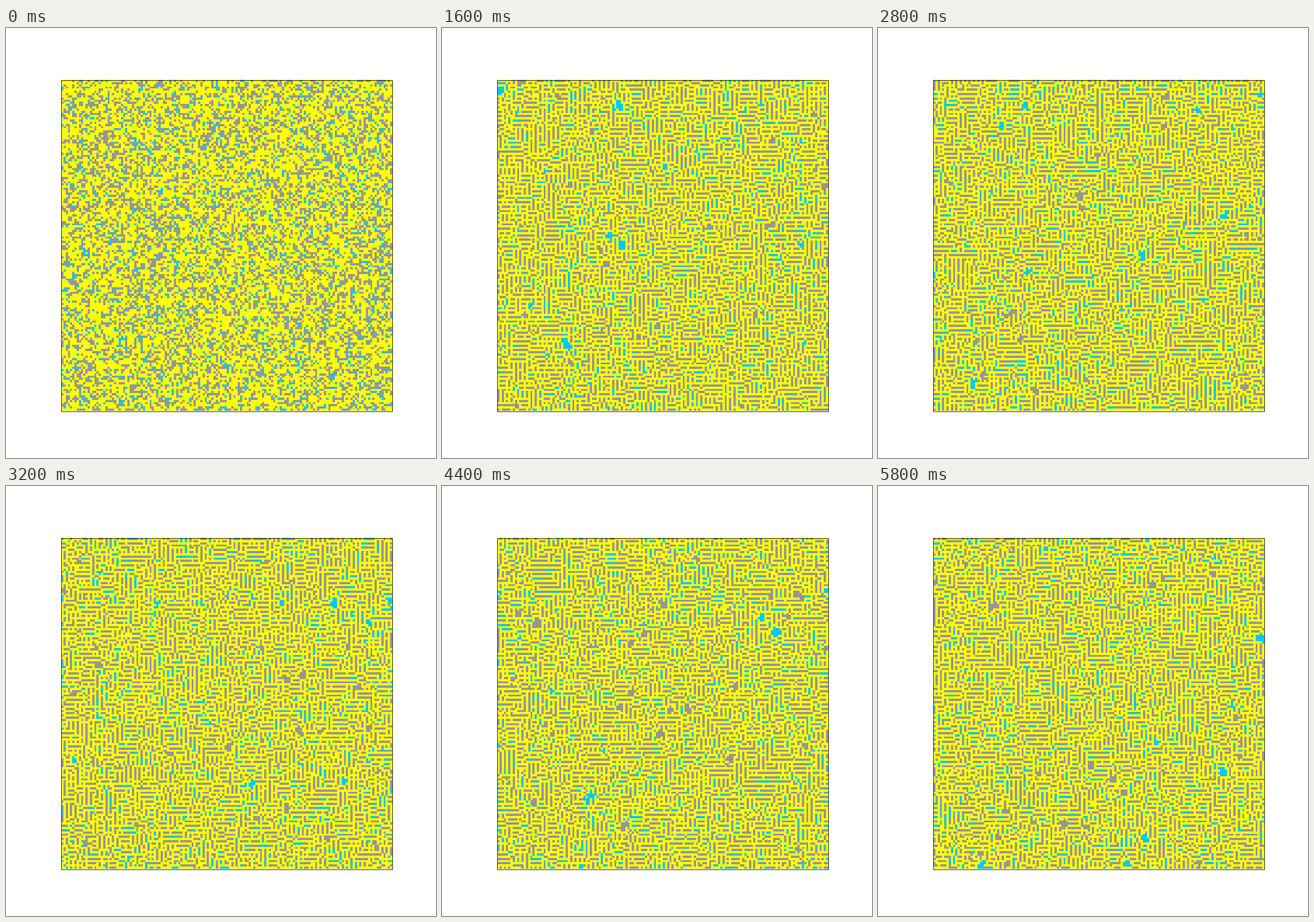
Animation of 748x748 px, one loop 6 s. Source, as a matplotlib script:

```python
import numpy as np
import matplotlib.pyplot as plt
from matplotlib.animation import FuncAnimation
from matplotlib.colors import ListedColormap
from matplotlib.patches import Rectangle

SIZE, DPI = 748, 100
LEFT, TOP, SIDE = 96, 90, 576
N = 150
FRAMES, INTERVAL = 30, 200
YELLOW, GRAY, CYAN = 0, 1, 2
ORTHO = [(0, 1), (1, 0), (0, -1), (-1, 0)]
DIAG = [(1, 1), (1, -1), (-1, 1), (-1, -1)]

rng = np.random.default_rng(11)


def chance(p):
    return rng.random((N, N)) < p


def shift(a, step):
    return np.roll(a, step, axis=(0, 1))


def count(a, steps):
    return sum(shift(a, s) for s in steps)


def relax(on, fixed, passes):
    """Cells avoid crowded sites, which sorts them into thin lines and dots."""
    for _ in range(passes):
        cost = count(on, ORTHO) + 0.8 * count(on, DIAG)
        p = 1 / (1 + np.exp((cost - 2.35) / 0.18))
        on = np.where(chance(0.2), chance(p), on).astype(int)
        on[fixed] = 1
    return on


def clumps(density):
    """Small solid patches, each of one colour."""
    seeds = chance(density)
    patch = seeds * np.where(chance(0.2), CYAN, GRAY)
    for _ in range(2):
        for s in ORTHO:
            grow = (patch == 0) & chance(0.42)
            patch = np.where(grow, shift(patch, s), patch)
    return patch


def paint(on, patch):
    """Neighbours copy each other's colour, so it runs along the lines."""
    color = on * np.where(chance(0.16), CYAN, GRAY)
    for _ in range(5):
        for k in rng.permutation(4):
            near = shift(color, ORTHO[k])
            copy = (on > 0) & (near > 0) & chance(0.25)
            color = np.where(copy, near, color)
    return np.where(patch > 0, patch, color)


def simulate(steps):
    grid = rng.choice([YELLOW, GRAY, CYAN], size=(N, N), p=[0.61, 0.32, 0.07])
    history = [grid]
    on = (grid > 0).astype(int)
    for step in range(1, steps + 1):
        if step > 1:
            on = np.where(chance(0.5), chance(0.43), on).astype(int)
        patch = clumps(0.0016 if step > 1 else 0)
        on = relax(on, patch > 0, min(6 + 6 * step, 30))
        history.append(paint(on, patch))
    return history


history = simulate(FRAMES - 2)

fig = plt.figure(figsize=(SIZE / DPI, SIZE / DPI), dpi=DPI, facecolor="white")
ax = fig.add_axes([0, 0, 1, 1])
ax.axis("off")
image = ax.imshow(history[0], cmap=ListedColormap(["#ffff00", "#969696", "#00c8ff"]),
                  vmin=0, vmax=2, interpolation="nearest", aspect="auto",
                  extent=(LEFT, LEFT + SIDE, TOP + SIDE, TOP))
ax.add_patch(Rectangle((LEFT + 0.5, TOP + 0.5), SIDE, SIDE, fill=False,
                       ec="#262626", lw=72 / DPI, zorder=3))
ax.set_xlim(0, SIZE)
ax.set_ylim(SIZE, 0)


def draw(i):
    # the opening state holds for two ticks
    image.set_data(history[max(i - 1, 0)])
    return [image]


anim = FuncAnimation(fig, draw, frames=FRAMES, interval=INTERVAL,
                     repeat=True, repeat_delay=0)
plt.show()
```
